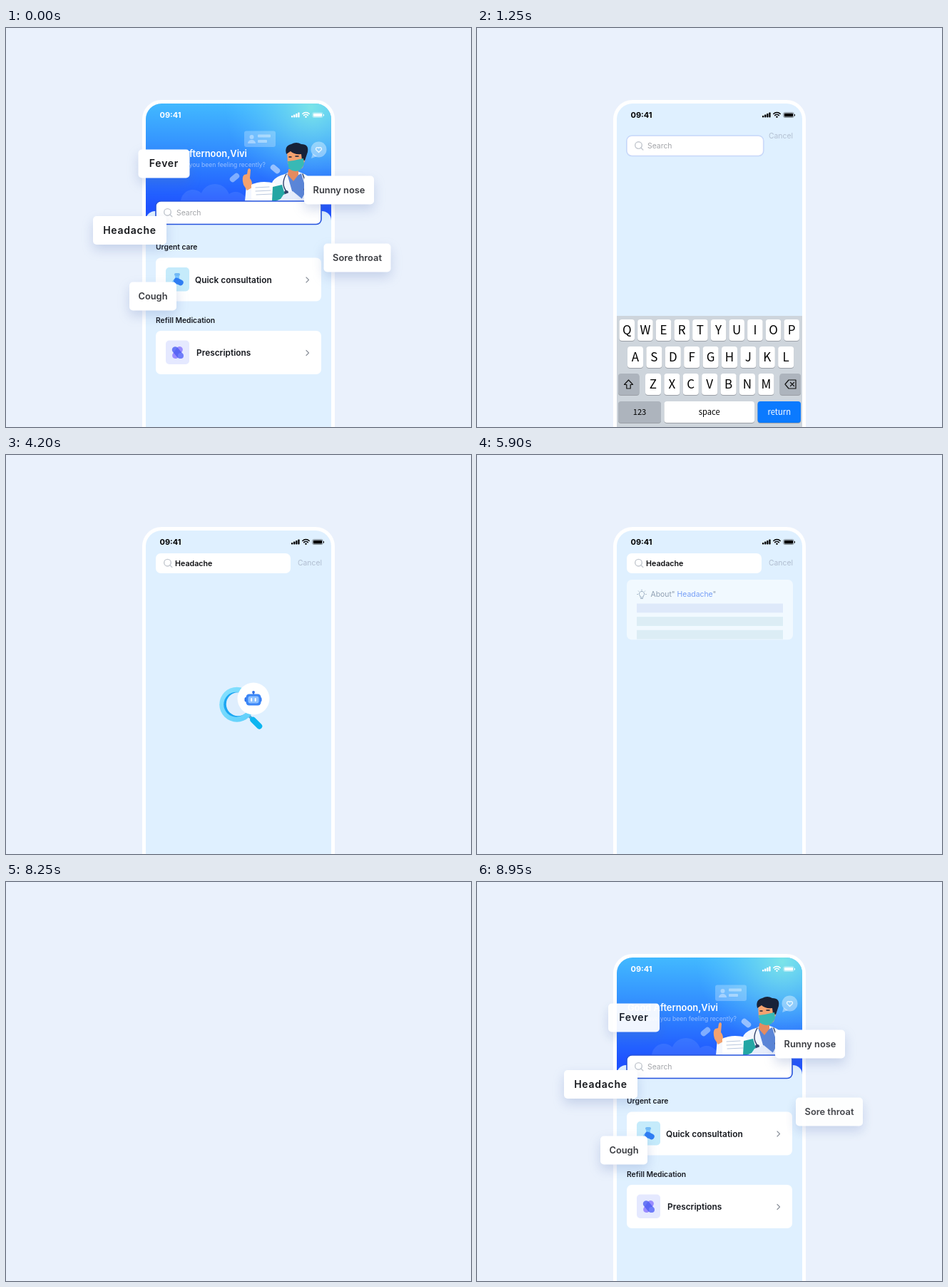
These frames come from a looping animation (652 px wide and 560 px high, 9000 ms). An HTML page:

```html
<!DOCTYPE html>
<html lang="en">
<head>
<meta charset="utf-8">
<title>Symptom search</title>
<style>
  html, body { margin: 0; width: 100%; height: 100%; overflow: hidden; background: #eaf1fc; }
  svg { display: block; width: 652px; height: 560px; }
  text { font-family: Inter, sans-serif; }
  #keyboard text { font-family: "Noto Sans CJK SC", "Noto Sans CJK", "Noto Sans", sans-serif; }
  .tag { filter: drop-shadow(0 7px 8px rgba(80, 110, 175, .24)); }
</style>
</head>
<body>
<svg id="stage" viewBox="0 0 652 560"></svg>
<script>
const LOOP = 9000, STEP = 50, INTRO = 8250;

const rect = (x, y, w, h, r, fill, more = '') =>
  `<rect x="${x}" y="${y}" width="${w}" height="${h}" rx="${r}" fill="${fill}" ${more}/>`;
const circle = (x, y, r, fill, more = '') => `<circle cx="${x}" cy="${y}" r="${r}" fill="${fill}" ${more}/>`;
const path = (d, fill, more = '') => `<path d="${d}" fill="${fill}" ${more}/>`;
const line = (d, stroke, width, more = '') =>
  path(d, 'none', `stroke="${stroke}" stroke-width="${width}" stroke-linecap="round" stroke-linejoin="round" ${more}`);
const text = (x, y, size, weight, fill, str, more = '') =>
  `<text x="${x}" y="${y}" font-size="${size}" font-weight="${weight}" fill="${fill}" ${more}>${str}</text>`;
const group = (id, body, more = '') => `<g id="${id}" ${more}>${body}</g>`;
const MID = 'text-anchor="middle"', END = 'text-anchor="end"';

const defs = `<defs>
  <linearGradient id="sky" x1="0" y1="0" x2="0" y2="1">
    <stop offset="0" stop-color="#42b9ff"/><stop offset=".45" stop-color="#2f86ff"/><stop offset=".85" stop-color="#1e52ff"/>
  </linearGradient>
  <radialGradient id="glow" cx="428" cy="112" r="120" gradientUnits="userSpaceOnUse">
    <stop offset="0" stop-color="#86ece4" stop-opacity=".85"/><stop offset="1" stop-color="#5fd0ff" stop-opacity="0"/>
  </radialGradient>
  <linearGradient id="ring" x1="0" y1="0" x2="1" y2="1">
    <stop offset="0" stop-color="#8be3ff"/><stop offset="1" stop-color="#5acdfa"/>
  </linearGradient>
  <clipPath id="screen">${rect(196, 106, 260, 500, 22, '#000')}</clipPath>
  <clipPath id="cardClip">${rect(210, 175, 233, 83, 7, '#000', 'id="cardShape"')}</clipPath>
</defs>`;

const doctor = `
  ${rect(334, 144.5, 44, 22.5, 3, '#fff', 'opacity=".25"')}
  <g fill="#fff" opacity=".38">
    <circle cx="344.500" cy="153" r="3"/><path d="M339 162a5.500 5 0 0 1 11 0z"/>
    <rect x="353" y="149.500" width="18" height="4" rx="1"/><rect x="353" y="157" width="13" height="4" rx="1"/>
  </g>
  <g fill="#fff" opacity=".09">
    <circle cx="262" cy="244" r="17"/><circle cx="293" cy="240" r="21"/><circle cx="322" cy="246" r="16"/>
  </g>
  ${rect(313, 206, 15, 8, 4, '#9cc2ff', 'opacity=".75" transform="rotate(-40 320.500 210)"')}
  ${rect(370, 194, 15, 8, 4, '#b9d5ff', 'opacity=".75" transform="rotate(40 377.500 198)"')}
  ${circle(438.5, 170.5, 11, '#fff', 'opacity=".38"')}${path('M430 176l-2 7 8-3z', '#fff', 'opacity=".38"')}
  ${line('M438.500 174.500l-4-4a2.300 2.300 0 0 1 4-2a2.300 2.300 0 0 1 4 2z', '#eaf7ff', 1.3)}
  ${path('M362 243l12-28q5-7 17-10l12-6 13 5q11 4 14 13l2 26z', '#f3f7ff')}
  ${path('M394 204l9 6 11-6 7 24-8 15h-8z', '#5b86d8')}
  ${path('M396 198h14v8l-7 9-8-9z', '#e58b5f')}
  ${line('M393 205q-8 14 0 24M416 205q6 14 2 22', '#31436b', 1.4)}${circle(393, 231, 3, '#31436b')}
  ${path('M394 172q0-5 8-6l14 1q7 5 4 16l-4 13q-7 6-15 2l-6-8z', '#f4a26f')}
  ${path('M393 177q-3-12 7-14 7-4 14 0 11 0 9 11l-4 12-4-1-1-8q-10 1-15-4z', '#172238')}
  ${path('M395 187q10-1 22-4l1 8q-4 10-12 10-9-1-10-6z', '#38b9b5')}
  ${line('M397 181h3M406 180h4', '#172238', 1.4)}
  ${path('M335 243l2-23 14-1 12 24z', '#f3f7ff')}
  ${path('M333 220q-3-11 1-14l4-1 1-6q2-4 4 0l-1 12q4 4 3 13l-7 4z', '#f4a26f')}
  ${path('M344 220q14-7 33-2l8 20-8 5h-33z', '#fff')}
  ${line('M350 224l19-1M350 229l21-1M351 234l22-1', '#b9c7de', 1)}
  ${path('M374 223l13-3 5 17-14 6h-5z', '#23a6a4')}
  ${path('M389 234l13-5 17 14h-36z', '#e6edfb')}`;

const careRow = (y, icon, label, x) => rect(210, y, 232, 61, 7, '#fff') + icon +
  text(x, y + 35, 11.9, 600, '#15181e', label) + line(`M421 ${y + 27.500}l3.500 3.500-3.500 3.500`, '#8d939c', 1.2);

const flask = rect(224, 336, 33, 33.5, 5, '#c5ebfb') + rect(236, 344, 8, 4, 2, '#72b9f5') +
  path('M237 348h6v4q5 3 4 8h-14q-1-6 4-8z', '#7cc7ff') + rect(235, 352, 14, 8, 4, '#2f7df3', 'transform="rotate(25 242 356)"');
const pills = rect(224, 438.500, 33, 33.5, 5, '#e5e9ff') +
  rect(231, 451, 19, 9, 4.5, '#9a8cff', 'transform="rotate(-55 240.500 455.500)"') +
  rect(231, 451, 19, 9, 4.5, '#4a5df2', 'opacity=".8" transform="rotate(50 240.500 455.500)"') + circle(245, 460, 4, '#6f7dfa');

const home = rect(196, 106, 260, 170, 0, 'url(#sky)') + rect(196, 106, 260, 170, 0, 'url(#glow)') + doctor +
  rect(196, 257, 260, 320, 13, '#dff0ff') +
  text(338, 181, 12.9, 600, '#fff', 'Good Afternoon,Vivi', END) +
  text(364, 194.5, 8.6, 400, '#fff', 'How have you been feeling recently?', END + ' opacity=".5"') +
  text(210, 311, 10.3, 600, '#15181e', 'Urgent care') + text(210, 413.5, 10.3, 600, '#15181e', 'Refill Medication') +
  careRow(322.500, flask, 'Quick consultation', 265) + careRow(425, pills, 'Prescriptions', 267);

const key = (x, y, w, label, fill = '#fff', ink = '#000', size = 17) =>
  rect(x, y + 1, w, 30, 4, '#9a9fa6') + rect(x, y, w, 30, 4, fill) +
  text(x + w / 2, y + 15 + size * .37, size, 400, ink, label, MID);
const keyRow = (letters, x, y, w, pitch) => [...letters].map((c, i) => key(x + i * pitch, y, w, c)).join('');
const keyboard = rect(196, 404, 260, 160, 0, '#ced5dc') +
  keyRow('QWERTYUIOP', 199.5, 409, 21.5, 25.66) + keyRow('ASDFGHJKL', 211, 447, 22, 26.4) +
  keyRow('ZXCVBNM', 236, 485, 22, 26.4) +
  key(198, 485, 29.5, '', '#adb4bd') + key(424.5, 485, 29.5, '', '#adb4bd') +
  line('M212.500 494l6 6.500h-3.300v5.500h-5.400v-5.500h-3.300z', '#111', 1.2) +
  line('M437 494h10v12h-10l-5-6zM439.500 497.500l5 5m0-5l-5 5', '#111', 1.2) +
  key(198, 524, 60, '123', '#adb4bd', '#000', 11.2) + key(262.5, 524, 126.5, 'space', '#fff', '#000', 11.2) +
  key(393.5, 524, 60.5, 'return', '#0b7aff', '#fff', 11.2);

const lens = line('M341 367l5 5', '#4aa9dc', 4) + line('M346 372l9 9', '#0cb5f0', 8) +
  circle(323.5, 350.5, 24.5, 'url(#ring)') + circle(322.5, 350.5, 17.5, '#1ba6f2') + circle(325, 350, 16.5, '#dfeefd');
const robot = line('M347 336v-3', '#2a6fe8', 1.5) + circle(347, 333, 1.900, '#2a6fe8') +
  rect(334.5, 340, 24, 6.5, 2, '#2a6fe8') + rect(336.5, 335.5, 21, 16, 4.5, '#3b86f7') + rect(339.5, 338.5, 15, 10, 3, '#8cc0ff');
const eyes = rect(343.2, 341, 2, 5, 1, '#fff') + rect(348.7, 341, 2, 5, 1, '#fff');

const bars = Array.from({ length: 18 }, (_, i) => rect(224, 208.5 + i * 18.6, 205, 12.8, 0, i ? '#daebee' : '#dfe4f7')).join('');
const result = rect(210, 175, 233, 371, 0, '#fff') +
  line('M229 199.500v-1.500a3.600 3.600 0 1 1 4 0v1.500zM229.500 201.500h3M231 190v-.8M225.500 195.500h-.8M237.300 195.500h-.8M227 191.500l-.6-.6M235 191.500l.6-.6', '#6d7f96', 1) +
  `<text x="243.500" y="199.300" font-size="10.400" fill="#56647a">About" <tspan fill="#2a62f0">Headache</tspan>"</text>` + bars;

const status = text(215.5, 126, 11, 700, 'currentColor', '09:41') +
  [2.5, 4, 5.5, 7].map((h, i) => rect(400 + i * 3.1, 125.5 - h, 2.3, h, .7, 'currentColor')).join('') +
  line('M415.800 120.500a6.500 6.500 0 0 1 9.400 0M417.700 122.600a4 4 0 0 1 5.600 0', 'currentColor', 1.5) + circle(420.5, 124.7, 1.2, 'currentColor') +
  rect(429.7, 118.700, 14.6, 6.8, 2, 'none', 'stroke="currentColor" stroke-width=".7" stroke-opacity=".6"') +
  rect(430.8, 119.800, 12.4, 4.6, 1, 'currentColor') + rect(445, 120.900, 1, 2.5, .5, 'currentColor');

const field = rect(210, 243, 232, 32.5, 7, '#fff', 'id="box" stroke="#2553dd" stroke-width="1.600"') +
  group('inner', circle(226.5, -.8, 4.800, 'none', 'stroke="#c3c8cf" stroke-width="1.400"') + line('M230 2.800l2.800 2.800', '#c3c8cf', 1.4) +
    text(239, 3.6, 10.4, 400, '#a3a5a9', 'Search', 'id="hint"') + text(237, 4, 10.7, 600, '#0c0d10', 'Headache', 'id="query"'));

// label, box, direction it slides in from, entry start and duration
const tags = [
  ['Headache', 122, 264, 103, -1, 8350, 450], ['Cough', 173, 356.5, 66, -1, 8400, 450],
  ['Runny nose', 418, 207.5, 98, 1, 8450, 450], ['Fever', 185.5, 170.5, 72, -1, 8500, 600],
  ['Sore throat', 445.5, 302.5, 94, 1, 8500, 600],
];
const tag = ([label, x, y, w], i) => {
  const wide = label === 'Headache' || label === 'Fever';
  return group('tag' + i, rect(x, y, w, 40, 5, '#fff') +
    text(x + w / 2, y + 24.5, wide ? 14 : 12.85, 600, wide ? '#16181c' : '#3a3c41', label, MID + (wide ? ' letter-spacing=".75"' : '')), 'class="tag"');
};

document.getElementById('stage').innerHTML = defs +
  group('phone', rect(191, 101, 270, 520, 27, '#fff') +
    `<g clip-path="url(#screen)">${rect(196, 106, 260, 500, 0, '#dff0ff')}
      ${group('home', home)}${text(443, 155.3, 10.4, 400, '#b0bdcf', 'Cancel', END + ' id="cancel"')}
      ${group('keyboard', keyboard)}${group('lens', lens)}
      ${group('robot', circle(347, 342, 22.5, '#fff', 'id="disc"') + group('face', robot) + group('eyes', eyes))}
      ${group('result', result, 'clip-path="url(#cardClip)"')}${field}${group('status', status)}</g>`) +
  tags.map(tag).join('');

const el = id => document.getElementById(id);
const set = (id, attrs) => { for (const name in attrs) el(id).setAttribute(name, attrs[name]); };
const fade = (id, opacity) => set(id, { opacity });
const ramp = (t, from, to) => Math.min(1, Math.max(0, (t - from) / (to - from)));
const mix = (a, b, p) => a + (b - a) * p;
const easeOut = p => 1 - (1 - p) ** 2;
const easeInOut = p => p < .5 ? 2 * p * p : 1 - 2 * (1 - p) ** 2;
const sine = p => .5 - .5 * Math.cos(Math.PI * p);

function draw(time) {
  const intro = time >= INTRO, t = intro ? 0 : time;

  fade('phone', intro ? ramp(time, INTRO, 8550) : 1);
  tags.forEach(([, , , , side, start, length], i) => {
    const p = intro ? easeOut(ramp(time, start, start + length)) : 1;
    set('tag' + i, { opacity: p * (1 - ramp(t, 550, 800)), transform: `translate(${side * 24 * (1 - p)} 0)` });
  });

  // home to search page
  const open = easeInOut(ramp(t, 550, 1400)), rise = sine(ramp(t, 750, 1400)), dark = ramp(t, 550, 950);
  const top = mix(243, 138, rise), height = mix(32.5, 28, open);
  fade('home', 1 - dark);
  fade('cancel', open);
  set('box', { y: top, height, width: mix(232, 189, open), 'stroke-opacity': (1 - open) ** .6 });
  set('inner', { transform: `translate(0 ${top + height / 2})` });
  el('status').style.color = `rgb(${Array(3).fill(Math.round(255 * (1 - dark)))})`;
  const typed = ramp(t, 1750, 2350);
  fade('hint', 1 - typed);
  fade('query', typed);
  const shown = easeOut(ramp(t, 600, 1200)) - easeInOut(ramp(t, 2700, 3050));
  set('keyboard', { transform: `translate(0 ${158 * (1 - shown)})` });

  // loader: the lens circles twice behind the robot
  const gone = 1 - ramp(t, 5550, 5650);
  const turn = 2 * Math.PI * easeOut(t < 4600 ? ramp(t, 3650, 4600) : ramp(t, 4600, 5550));
  set('lens', {
    opacity: ramp(t, 3250, 3650) * gone,
    transform: `translate(${-6.5 - 7.5 * Math.sin(turn)} ${2.5 - 6.5 * Math.cos(turn)})`,
  });
  fade('robot', gone);
  fade('eyes', ramp(t, 2950, 3050));
  fade('face', ramp(t, 3050, 3350));
  set('disc', { r: 22.5 * easeOut(ramp(t, 3050, 3400)) });

  // result card
  fade('result', ramp(t, 5750, 6010));
  set('cardShape', { height: mix(54, 371, sine(ramp(t, 5750, 6500))) });
}

function tick() {
  draw(Math.floor(performance.now() % LOOP / STEP) * STEP);
  requestAnimationFrame(tick);
}
tick();
</script>
</body>
</html>
```
